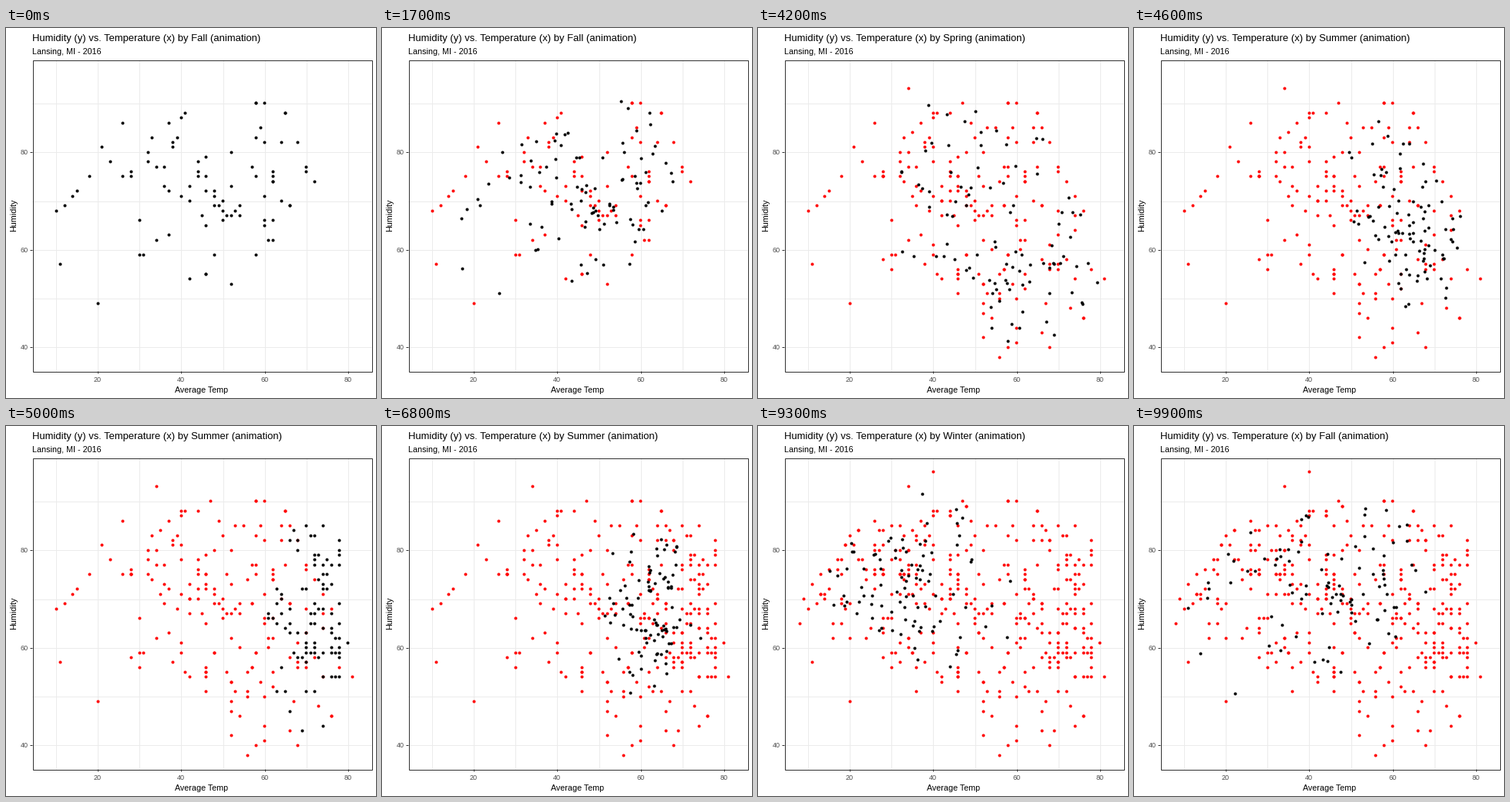
These frames come from a looping animation (480x480 px, 10000 ms). A matplotlib script:

```python
import matplotlib.pyplot as plt
import numpy as np
from matplotlib.animation import FuncAnimation
from matplotlib.patches import Rectangle

SIZE, DPI = 480, 72
LEFT, TOP, WIDTH, HEIGHT = 34, 41, 440, 404
X_RANGE, Y_RANGE = (4.3, 85.7), (35.1, 98.9)
HOLD, STEPS = 16, 9
PERIOD = HOLD + STEPS
DAYS = 90

# Humidity readings grouped by average temperature
FALL = {
    10: [68], 11: [57], 12: [69], 14: [71], 15: [72], 18: [75], 20: [49],
    21: [81], 23: [78], 26: [86, 75], 28: [76, 75], 30: [66, 59], 31: [59],
    32: [80, 78], 33: [83], 34: [77, 62], 36: [77, 73], 37: [86, 72, 63],
    38: [82, 81], 39: [83], 40: [87, 71], 41: [88], 42: [73, 70, 54],
    44: [78, 76, 75], 45: [67], 46: [79, 75, 72, 65, 55],
    48: [72, 71, 69, 59], 49: [69], 50: [70, 68, 66], 51: [67],
    52: [80, 73, 67, 53], 53: [68], 54: [69, 67], 57: [77],
    58: [90, 83, 75, 59], 59: [85], 60: [90, 82, 71, 66, 65], 61: [62],
    62: [76, 75, 74, 66, 62], 64: [82, 70], 65: [88], 66: [69], 68: [82],
    70: [77, 76], 72: [74],
}
SPRING = {
    28: [75, 58], 30: [56], 32: [75], 33: [74], 34: [93, 80], 35: [84, 71],
    36: [69], 38: [57], 39: [68], 40: [88, 81, 78, 61, 59], 41: [55],
    42: [70, 67], 44: [88, 72, 70], 46: [75, 73, 56, 54, 51], 47: [90],
    48: [80, 59], 49: [86], 50: [83], 51: [75, 55],
    52: [62, 53, 49, 47, 42], 53: [85, 51], 54: [60, 46], 55: [85],
    56: [74, 55, 51, 50, 38], 57: [69, 56], 58: [77, 59, 40], 59: [53],
    60: [50, 44, 41], 61: [60], 62: [55, 52], 64: [85], 65: [77],
    66: [85, 58, 43], 67: [49], 68: [61, 57, 56, 40], 70: [68, 63, 57, 56],
    72: [58], 73: [48], 74: [71, 67, 64, 54], 76: [68, 46], 78: [56],
    81: [54],
}
SUMMER = {
    61: [67, 66], 62: [66], 63: [72, 69, 65, 51], 64: [71, 70, 67, 56],
    65: [64, 51], 66: [82, 68, 65, 63, 47], 67: [84, 59],
    68: [82, 80, 63, 58], 69: [72, 58, 43],
    70: [85, 72, 63, 61, 60, 59, 57, 51], 71: [83, 67, 65, 59],
    72: [83, 79, 78, 77, 69, 67, 65, 61, 60, 59, 51], 73: [79, 74, 68, 58],
    74: [85, 77, 75, 73, 72, 68, 64, 59, 54, 44], 75: [78, 75, 72],
    76: [77, 73, 67, 64, 63, 60, 59, 54], 77: [62, 59, 54],
    78: [82, 80, 79, 77, 69, 65, 62, 60, 59, 58, 54], 80: [61, 50],
    82: [82, 70, 66, 65],
}
WINTER = {
    8: [65], 9: [70], 11: [73], 13: [75, 71], 14: [70], 15: [76],
    16: [65, 62], 17: [78, 76], 18: [78, 70, 69, 65], 19: [81, 68],
    20: [83, 69, 62], 22: [84, 78], 24: [76, 74, 62], 25: [64],
    26: [81, 80, 76, 75, 72], 27: [84, 80], 28: [84, 81, 66, 64, 63],
    29: [66], 30: [85, 78, 71], 31: [80], 32: [85, 75, 71, 61, 57],
    33: [75], 34: [80, 76, 75, 71, 62, 60], 35: [59],
    36: [83, 82, 75, 56, 51], 38: [85, 73, 69], 40: [96, 63], 42: [53],
    43: [68], 44: [87, 79, 71, 70], 46: [85, 74, 60, 54], 48: [89],
    49: [81], 50: [65], 51: [63], 60: [61], 62: [72],
}

NAMES = ["Fall", "Spring", "Summer", "Winter"]
TRENDS = [-1, 1, 0, 0]  # cooling, warming, steady, steady
rng = np.random.default_rng(4)


def to_px(temp, humidity):
    x = LEFT + (np.asarray(temp) - X_RANGE[0]) * WIDTH / (X_RANGE[1] - X_RANGE[0])
    y = TOP + (Y_RANGE[1] - np.asarray(humidity)) * HEIGHT / (Y_RANGE[1] - Y_RANGE[0])
    return x, y


def season_days(readings, trend):
    """Readings in a plausible day order; repeated readings fill the season."""
    points = np.array([(t, h) for t, hs in readings.items() for h in hs], float)
    missing = max(0, DAYS - len(points))
    points = np.vstack([points, rng.choice(points, missing)])[:DAYS]
    order = np.argsort(trend * points[:, 0] + rng.normal(0, 8, len(points)))
    return np.column_stack(to_px(*points[order].T))


seasons = [season_days(r, t) for r, t in zip([FALL, SPRING, SUMMER, WINTER], TRENDS)]

plt.rcParams["font.family"] = "Liberation Sans"
fig = plt.figure(figsize=(SIZE / DPI, SIZE / DPI), dpi=DPI, facecolor="white")
ax = fig.add_axes([0, 0, 1, 1])
ax.set(xlim=(0, SIZE), ylim=(SIZE, 0))
ax.axis("off")


def line(x, y, color):
    ax.plot(x, y, color=color, lw=1, solid_capstyle="butt", zorder=1)


def label(x, y, text, size, color="black", **kwargs):
    return ax.text(x, y, text, fontsize=size, color=color, **kwargs)


right, bottom = LEFT + WIDTH, TOP + HEIGHT
for temp in range(10, 90, 10):
    x = np.floor(to_px(temp, 0)[0]) + 0.5
    line([x, x], [TOP, bottom], "#ebebeb")
    if temp % 20 == 0:
        line([x, x], [bottom, bottom + 3], "#333333")
        label(x, 459, temp, 9, "#4d4d4d", ha="center")
for humidity in range(40, 100, 10):
    y = np.floor(to_px(0, humidity)[1]) + 0.5
    line([LEFT, right], [y, y], "#ebebeb")
    if humidity % 20 == 0:
        line([LEFT - 3, LEFT], [y, y], "#333333")
        label(29, y + 3.5, humidity, 9, "#4d4d4d", ha="right")
ax.add_patch(Rectangle((LEFT + 0.5, TOP + 0.5), WIDTH, HEIGHT, fill=False,
                       ec="#333333", lw=1, zorder=4))

title = label(34, 17, "", 13)
label(34, 34, "Lansing, MI - 2016", 10.7)
label(254, 473, "Average Temp", 10.8, ha="center")
label(15, 243, "Humidity", 10.8, rotation=90, ha="right", va="center")

dot = dict(marker="o", ls="", ms=4, mew=0)
trails = [ax.plot(*s.T, color="red", zorder=2, **dot)[0] for s in seasons]
current, = ax.plot([], [], color="black", zorder=3, **dot)


def update(frame):
    index, k = divmod(frame, PERIOD)
    t = max(0, k - HOLD) / STEPS
    following = (index + 1) % len(seasons)
    current.set_data(*((1 - t) * seasons[index] + t * seasons[following]).T)
    for i, trail in enumerate(trails):
        trail.set_visible(i < index or (i == index and t > 0))
    name = NAMES[following if t > 0.5 else index]
    title.set_text(f"Humidity (y) vs. Temperature (x) by {name} (animation)")
    return [*trails, current, title]


anim = FuncAnimation(fig, update, frames=len(seasons) * PERIOD, interval=100,
                     repeat=True, repeat_delay=0)
plt.show()
```
